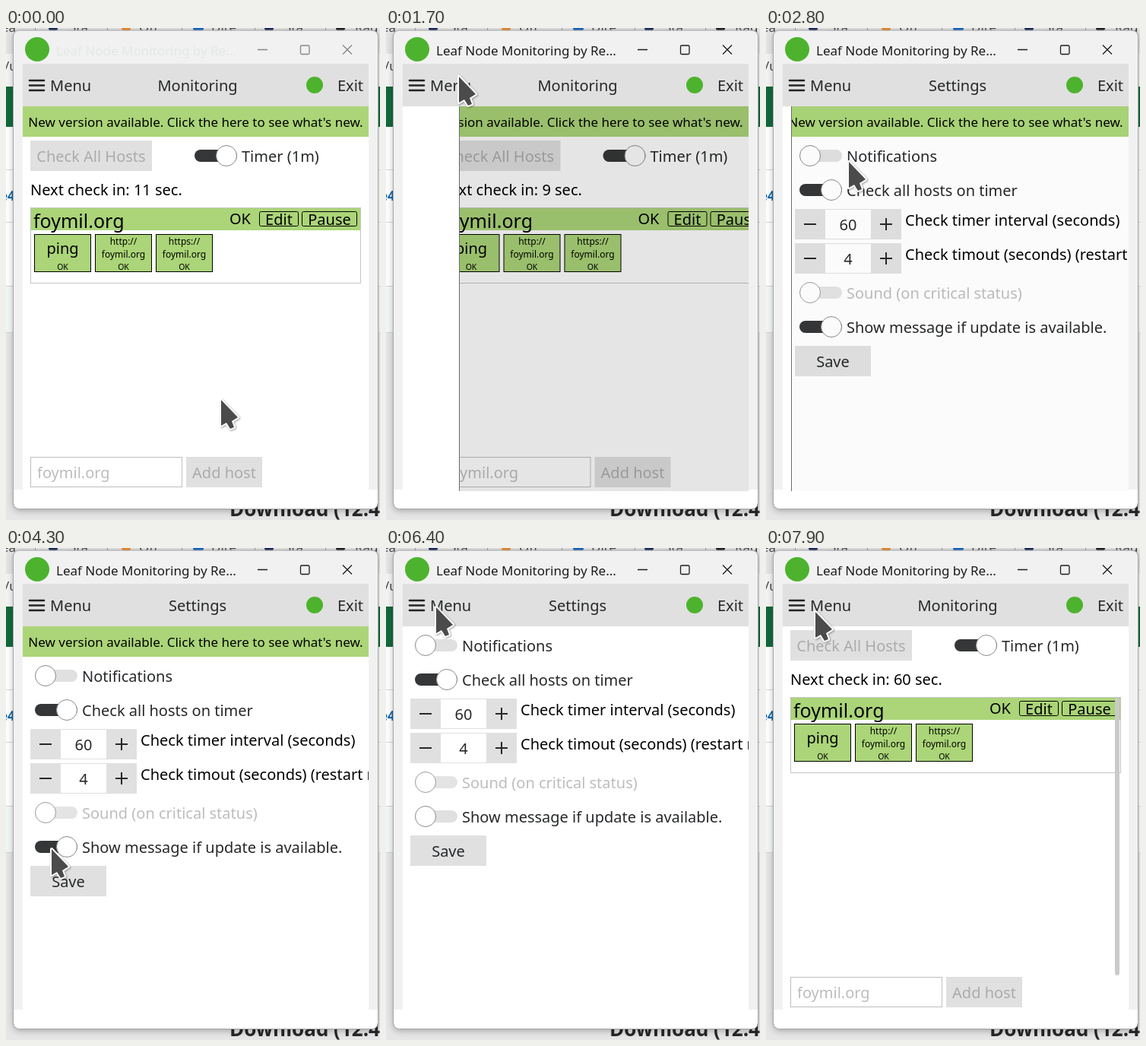
Animation, 492 px wide and 647 px high, one loop 8 s. Source, as an HTML page:

```html
<!DOCTYPE html>
<html lang="en">
<head>
<meta charset="utf-8">
<title>Monitoring window</title>
<style>
  html, body { margin: 0; width: 100%; height: 100%; overflow: hidden; }
  svg { display: block; width: 492px; height: 647px; }
  text { font: 20px "Noto Sans", sans-serif; fill: #26282a; }
  .mid { text-anchor: middle; }
  .black { fill: #000; }
  .off { fill: #ababab; }
  .hint { fill: #bdbdbd; }
  .s17 { font-size: 17px; }
  .s12 { font-size: 12px; }
  .s10 { font-size: 10.5px; }
  .host { font-size: 25px; }
  .gray { fill: #e0e0e0; }
  .green { fill: #abd578; }
  .tile { fill: #abd578; stroke: #000; }
  .line { fill: none; stroke: #26282a; stroke-width: 1.3; }
  .tabs text { font-size: 17px; fill: #444; }
  .knob { fill: #fff; stroke: #8a8a8a; }
  .faded .knob { stroke: #d0d0d0; }
  .track { fill: #e0e0e0; }
  .on .track { fill: #353637; }
  #cursor { fill: #4b4b4b; stroke: #fff; stroke-width: 4; stroke-linejoin: round; paint-order: stroke;
    filter: drop-shadow(1px 1px 1px rgba(0,0,0,.35)); }
  #window { filter: drop-shadow(0 2px 5px rgba(0,0,0,.3)); }
</style>
</head>
<body>
<svg viewBox="0 0 492 647">
  <defs>
    <clipPath id="area"><rect x="22" y="103" width="455" height="506"/></clipPath>
    <clipPath id="frame"><rect x="10" y="3.5" width="479" height="629" rx="8"/></clipPath>
    <g id="switch">
      <rect class="track" y="-8" width="56" height="16" rx="8"/>
      <circle class="knob" cx="14" r="13.5"/>
    </g>
    <g id="spin">
      <rect x="32.5" y=".5" width="139" height="39" fill="#fff" stroke="#e0e0e0"/>
      <path class="gray" d="M32 0h40v40h-40zM132 0h40v40h-40z"/>
      <path d="M44 20h16M144 20h16M152 12v16" stroke="#26282a" stroke-width="2"/>
    </g>
  </defs>

  <!-- desktop behind the window -->
  <rect width="492" height="647" fill="#fff"/>
  <rect width="492" height="34" fill="#e4e4e4"/>
  <rect y="34" width="492" height="43" fill="#f4f4f4"/>
  <rect y="77" width="492" height="53" fill="#12693b"/>
  <rect y="340" width="492" height="61" fill="#f3f7f6"/>
  <rect y="401" width="492" height="246" fill="#e6e6e6"/>
  <path d="M0 186.5H492M0 255.5H492M0 339.5H492M0 400.5H492" stroke="#d2d6d8"/>
  <g class="tabs">
    <text x="-6" y="5">ea</text><text x="83" y="5">Sta</text><text x="175" y="5">Off</text>
    <text x="270" y="5">Dire</text><text x="366" y="5">Sta</text><text x="459" y="5">Rad</text>
    <path d="M38.5 0v6M133.5 0v6M231.5 0v6M327.5 0v6M420.5 0v6" stroke="#999"/>
    <circle cx="62" r="6" fill="#1d2a5c"/><circle cx="158" r="6" fill="#ee8a2a"/>
    <circle cx="253" r="7" fill="#1565c0"/><circle cx="346" r="6" fill="#1d2a5c"/>
    <circle cx="440" r="6" fill="#222"/>
    <text x="-2" y="56">/u</text>
  </g>
  <text x="-8" y="227" style="font-size:17px;font-weight:700;fill:#0d65ab">e4</text>
  <text x="294" y="642" style="font-size:26px;font-weight:700">Download (12.4</text>

  <!-- window -->
  <g id="window"><rect x="10" y="3.5" width="479" height="629" rx="8" fill="#fff"/></g>
  <g clip-path="url(#frame)">
    <path d="M10 3h479v604h-12V47H22v560H10z" fill="#f1f1f1"/>
  </g>
  <rect x="9.5" y="3" width="480" height="629.5" rx="8" fill="none" stroke="#a5a5a5"/>
  <circle cx="41" cy="28" r="16" fill="#4db32e"/>
  <text id="caption" class="s17" x="66" y="36">Leaf Node Monitoring by Re...</text>
  <g id="buttons" class="line">
    <path d="M331 28.5h13M443 22.5l12 12M455 22.5l-12 12"/>
    <rect x="387.5" y="23" width="11.5" height="11.5" rx="1.5"/>
  </g>

  <!-- header -->
  <rect class="gray" x="22" y="47" width="455" height="56"/>
  <rect id="pressedMenu" x="22" y="55" width="97" height="40" fill="#bdbdbd"/>
  <path d="M31 69h19M31 75.5h19M31 82h19" stroke="#222" stroke-width="2.6" stroke-linecap="round"/>
  <text x="58" y="83">Menu</text>
  <text id="heading" class="mid" x="252" y="83"></text>
  <circle cx="406" cy="75" r="11" fill="#4db32e"/>
  <text x="436" y="83">Exit</text>

  <g clip-path="url(#area)">
    <g id="page">
      <g id="monitoring">
        <g class="lift">
          <rect class="gray" x="32" y="148" width="160" height="40"/>
          <text class="mid off" x="112" y="176">Check All Hosts</text>
          <g class="on" transform="translate(248 168)">
            <rect class="track" y="-8" width="56" height="16" rx="8"/>
            <circle class="knob" cx="42" r="13.5"/>
          </g>
          <text x="310" y="176">Timer (1m)</text>
          <text id="countdown" class="black" x="32" y="220"></text>
          <rect x="32.5" y="236.5" width="434" height="99" fill="#fff" stroke="#c4c4c4"/>
          <rect class="green" x="33" y="237" width="433" height="29"/>
          <text class="host black" x="36" y="263">foymil.org</text>
          <text class="black" x="294" y="258">OK</text>
          <rect class="tile" x="333.5" y="241.5" width="51" height="19" rx="2"/>
          <rect class="tile" x="389.5" y="241.5" width="72" height="19" rx="2"/>
          <text class="mid black" x="359" y="259">Edit</text>
          <text class="mid black" x="425.5" y="259">Pause</text>
          <g id="tiles"></g>
        </g>
        <rect x="32.5" y="564.5" width="199" height="39" fill="#fff" stroke="#bdbdbd"/>
        <text class="hint" x="41" y="592">foymil.org</text>
        <rect class="gray" x="237" y="564" width="100" height="40"/>
        <text class="mid off" x="287" y="592">Add host</text>
        <rect id="scrollbar" x="459" y="197" width="6" height="365" rx="3" fill="#cacaca"/>
      </g>
      <g id="settings">
        <g class="lift">
          <use href="#switch" x="38" y="168"/>
          <text x="100" y="176">Notifications</text>
          <g class="on" transform="translate(38 213)">
            <rect class="track" y="-8" width="56" height="16" rx="8"/>
            <circle class="knob" cx="42" r="13.5"/>
          </g>
          <text x="100" y="221">Check all hosts on timer</text>
          <use href="#spin" y="238"/>
          <text class="mid" x="102" y="266">60</text>
          <text class="black" x="177" y="260">Check timer interval (seconds)</text>
          <use href="#spin" y="283"/>
          <text class="mid" x="102" y="311">4</text>
          <text class="black" x="177" y="305">Check timout (seconds) (restart needed)</text>
          <g class="faded"><use href="#switch" x="38" y="348" opacity=".85"/></g>
          <text class="hint" x="100" y="356">Sound (on critical status)</text>
          <g id="updates" transform="translate(38 393)">
            <rect class="track" y="-8" width="56" height="16" rx="8"/>
            <circle class="knob" id="updateKnob" r="13.5"/>
          </g>
          <text x="100" y="401">Show message if update is available.</text>
          <rect class="gray" x="32" y="418" width="100" height="40"/>
          <text class="mid" x="82" y="446">Save</text>
        </g>
      </g>
    </g>
    <g id="banner">
      <rect class="green" x="22" y="103" width="455" height="40"/>
      <text class="mid s17 black" x="249.5" y="130">New version available. Click the here to see what's new.</text>
    </g>
    <rect id="dim" x="22" y="103" width="455" height="506"/>
    <g id="drawer">
      <rect x="22" y="103" width="299" height="506" fill="#fff"/>
      <rect x="321" y="103" width="1" height="506" fill="#6b6b6b"/>
      <rect id="itemPressed" x="22" y="103" width="299" height="52" fill="#e4e4e4"/>
      <rect id="itemFocus" x="22" y="155" width="299" height="52" fill="#f6f6f6"/>
      <text x="34" y="137">Monitoring</text>
      <text id="itemSettings" x="34" y="189">Settings</text>
      <text x="34" y="241">About</text>
    </g>
  </g>
  <path id="cursor" d="M0 0V34L7 30L12 38L17 36L14 28L22 23Z"/>
</svg>

<script>
const LOOP = 8000;
const $ = id => document.getElementById(id);

$("tiles").innerHTML = ["", "http://", "https://"].map((scheme, i) => {
  const x = 37 + 80 * i, cx = x + 37.5;
  const label = (y, size, text) => `<text class="mid black ${size}" x="${cx}" y="${y}">${text}</text>`;
  return `<rect class="tile" x="${x + .5}" y="271.5" width="74" height="49"/>` +
    (scheme ? label(285, "s12", scheme) + label(302, "s12", "foymil.org") : label(297, "", "ping")) +
    label(318, "s10", "OK");
}).join("");

// Each step changes only the listed properties and holds until the next one.
const steps = [
  [0, { x: 283, y: 489, page: "Monitoring", secs: 11, drawer: 0, banner: 1, update: 1 }],
  [800, { x: 262, y: 440 }],
  [900, { x: 205, y: 310 }],
  [1000, { x: 150, y: 180, secs: 10 }],
  [1100, { x: 108, y: 85 }],
  [1200, { x: 94, y: 65 }],
  [1600, { x: 96, y: 64, secs: 9, active: 1, menu: 1 }],
  [1700, { menu: 0, drawer: .25 }],
  [1800, { drawer: .65, x: 98, y: 100 }],
  [1900, { drawer: .92, x: 102, y: 150 }],
  [2000, { drawer: 1, x: 104, y: 176 }],
  [2200, { x: 106 }],
  [2300, { x: 109 }],
  [2600, { page: "Settings", drawer: .75 }],
  [2700, { drawer: .3 }],
  [2800, { drawer: .04 }],
  [4300, { drawer: 0, x: 60, y: 396 }],
  [4800, { update: .6 }],
  [4900, { update: .15, banner: 0 }],
  [5000, { update: 0 }],
  [5300, { x: 56, y: 372 }],
  [5400, { x: 52, y: 353 }],
  [6400, { x: 66, y: 78 }],
  [6900, { drawer: .6, focus: 1, x: 78, y: 104 }],
  [7000, { drawer: 1, x: 84, y: 109 }],
  [7300, { pressed: 1 }],
  [7700, { page: "Monitoring", secs: 60, drawer: .55 }],
  [7900, { drawer: 0, x: 65, y: 84, scroll: 1 }],
];

const show = (id, on) => $(id).setAttribute("visibility", on ? "visible" : "hidden");
const move = (el, x, y) => el.setAttribute("transform", `translate(${x} ${y})`);
const lifts = document.querySelectorAll(".lift");

function draw(t) {
  const s = Object.assign({}, ...steps.filter(([at]) => at <= t).map(step => step[1]));
  const monitoring = s.page === "Monitoring";
  $("heading").textContent = s.page;
  $("countdown").textContent = `Next check in: ${s.secs} sec.`;
  $("monitoring").style.display = monitoring ? "" : "none";
  $("settings").style.display = monitoring ? "none" : "";
  $("caption").style.fill = s.active ? "#1b1b1b" : "#e2e8e5";
  $("buttons").style.stroke = s.active ? "#1b1b1b" : "#858585";
  show("pressedMenu", s.menu);
  show("banner", s.banner);
  show("scrollbar", s.scroll);
  show("itemPressed", s.pressed);
  show("itemFocus", s.focus);
  $("itemSettings").style.fill = s.focus ? "#000" : "#26282a";
  lifts.forEach(el => move(el, 0, s.banner ? 0 : -40));
  $("updates").setAttribute("class", s.update > .5 ? "on" : "");
  $("updateKnob").setAttribute("cx", 14 + 28 * s.update);
  move($("page"), 150 * s.drawer, 0);
  move($("drawer"), 300 * (s.drawer - 1), 0);
  $("dim").setAttribute("opacity", .415 * s.drawer);
  move($("cursor"), s.x, s.y);
}

function tick() {
  draw(performance.now() % LOOP);
  requestAnimationFrame(tick);
}
tick();
</script>
</body>
</html>
```
